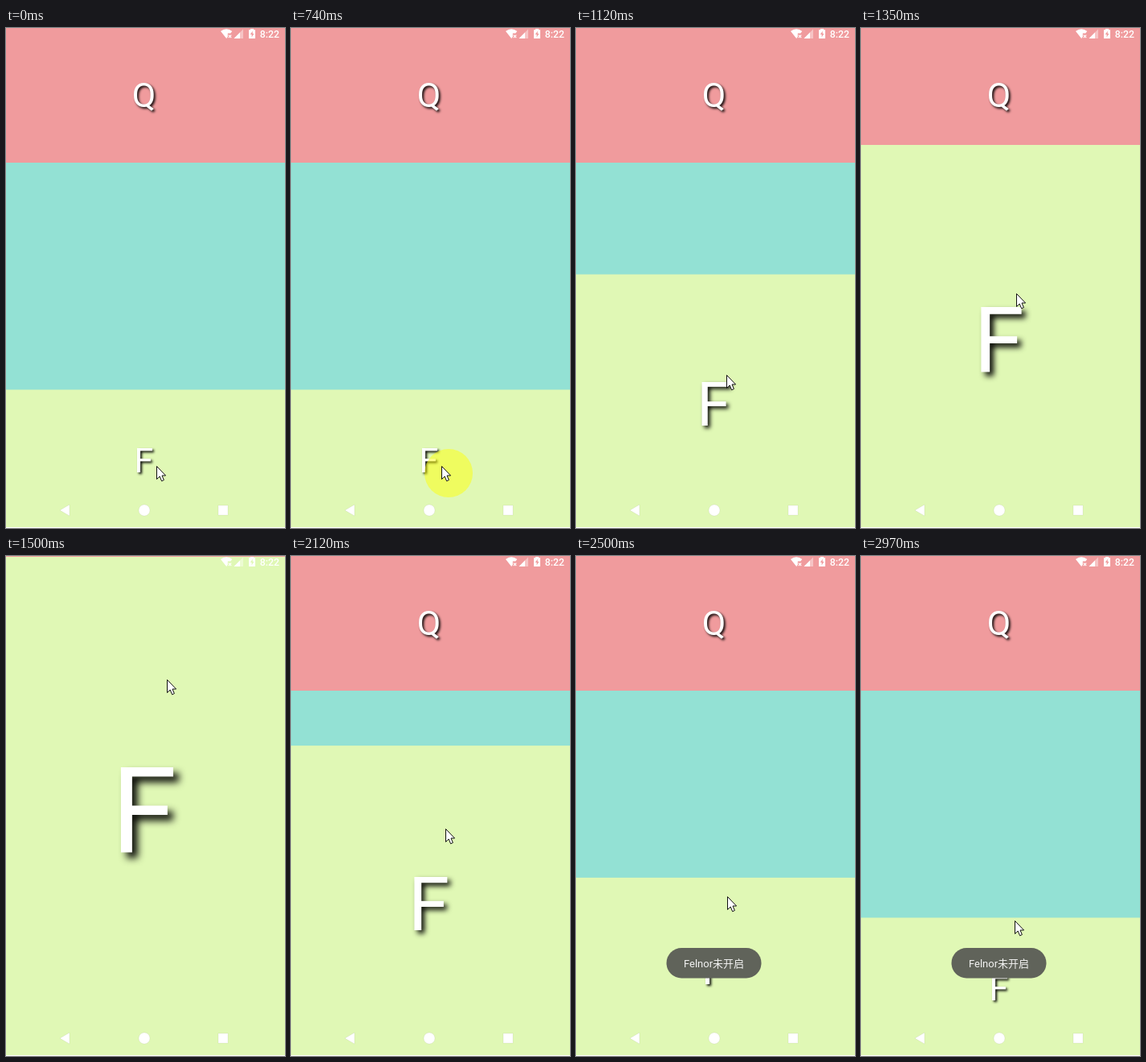
An HTML page for the animation above (3.35 s loop, 347 px wide and 620 px high).

```html
<!DOCTYPE html>
<html lang="zh">
<head>
<meta charset="utf-8">
<style>
  html, body { margin: 0; width: 100%; height: 100%; overflow: hidden; }
  svg { display: block; width: 347px; height: 620px; }
  text { font-family: Roboto, "Noto Sans CJK SC", "Noto Sans CJK", sans-serif; fill: #fff; }
  .letter { text-anchor: middle; filter: drop-shadow(.05em .05em .034em rgba(0, 0, 0, .95)); }
  .nav { fill: #fff; stroke: #000; stroke-opacity: .06; }
</style>
</head>
<body>
<svg viewBox="0 0 347 620">
  <rect width="347" height="620" fill="#93e1d4"/>
  <rect width="347" height="167" fill="#f09b9d"/>
  <text class="letter" x="171.500" y="98.1" font-size="43">Q</text>

  <rect id="panel" width="347" height="620" fill="#e0f8b5"/>
  <rect y="619" width="347" height="1" fill="#fff"/>
  <text id="letter" class="letter" x="171.500">F</text>

  <g fill="#fff">
    <path d="M267 4Q274-1.6 281.300 4L279.300 6.600H275.800V11L274.200 13Z"/>
    <path d="M276.800 8.600L280.200 12.200M280.200 8.600L276.800 12.200" stroke="#fff" stroke-width="1.200"/>
    <path d="M283.500 13L295 1.500V13Z" opacity=".4"/>
    <path d="M283.500 13L291 5.500V13Z"/>
    <path fill-rule="evenodd" d="M304 2.200V1H308V2.200H310V13H302V2.200ZM306.700 3.800L303.800 8H305.600V11.400L308.400 7H306.700Z"/>
    <text x="340" y="12" font-size="12.300" font-weight="500" text-anchor="end">8:22</text>
  </g>

  <g class="nav">
    <path d="M67 598L79 591V605Z"/>
    <circle cx="172" cy="598" r="7"/>
    <rect x="264" y="592" width="12" height="12"/>
  </g>

  <g id="toast">
    <rect x="112.500" y="486" width="118" height="37.500" rx="18.700" fill="#60635a"/>
    <text x="171.500" y="510" font-size="13" text-anchor="middle" opacity=".92">Felnor未开启</text>
  </g>
  <circle id="press" cx="196" cy="552" r="30" fill="#ff0" opacity=".48"/>
  <path id="cursor" d="M.5.5V16.500L4.200 13L6.600 18.800L9.400 17.500L7 12H11.600Z" fill="#fff" stroke="#111"/>
</svg>
<script>
  const LOOP = 3350, PRESS = 740, DRAG = 890, TICK = 230 / 3;
  const REST = 448.5, OPEN = 1;
  const $ = id => document.getElementById(id);
  const panel = $('panel'), letter = $('letter'), toast = $('toast'),
        press = $('press'), cursor = $('cursor');

  const pose = (n, top, x, y) => ({ n, top, x, y });
  const poses = [
    pose(-1, REST, 187, 543),
    pose(3, 305.5, 187, 430),
    pose(6, 145, 193, 329),
    pose(8, OPEN, 200, 153),
    pose(11, OPEN, 200, 150),
    pose(18, 325.5, 189, 398),
    pose(25, REST, 187, 443),
    pose(27, REST, 191, 452)
  ];

  const clamp = (v, lo, hi) => Math.min(hi, Math.max(lo, v));

  // Slope at pose i; zero at turning points so the curve never overshoots.
  function slope(key, i) {
    if (i < 1 || i > poses.length - 2) return 0;
    const [a, b, c] = poses.slice(i - 1, i + 2);
    const p = (b[key] - a[key]) / (b.n - a.n), q = (c[key] - b[key]) / (c.n - b.n);
    return p * q > 0 ? 2 * p * q / (p + q) : 0;
  }

  // Smooth cubic through the poses.
  function at(key, n) {
    const last = poses.length - 1;
    n = clamp(n, poses[0].n, poses[last].n);
    const i = clamp(poses.findIndex(p => p.n > n) - 1, 0, last);
    if (n === poses[last].n) return poses[last][key];
    const a = poses[i], b = poses[i + 1], span = b.n - a.n;
    const s = (n - a.n) / span, r = 1 - s;
    return r * r * (1 + 2 * s) * a[key] + s * s * (1 + 2 * r) * b[key]
      + span * s * r * (r * slope(key, i) - s * slope(key, i + 1));
  }

  function draw(t) {
    const n = Math.floor((t - DRAG + 4) / TICK);
    const top = at('top', n);
    const size = 43 + (REST - top) * .234;
    panel.setAttribute('y', top);
    letter.setAttribute('y', (top + 620) / 2 + size * .3925);
    letter.style.fontSize = size + 'px';
    toast.setAttribute('opacity', clamp((n - 16) / 4, 0, 1));
    press.style.display = t >= PRESS && t < DRAG ? '' : 'none';
    const x = Math.round(at('x', n)), y = Math.round(at('y', n));
    cursor.setAttribute('transform', `translate(${x} ${y})`);
  }

  const begin = performance.now();
  function loop() {
    draw((performance.now() - begin) % LOOP);
    requestAnimationFrame(loop);
  }
  draw(0);
  requestAnimationFrame(loop);
</script>
</body>
</html>
```
